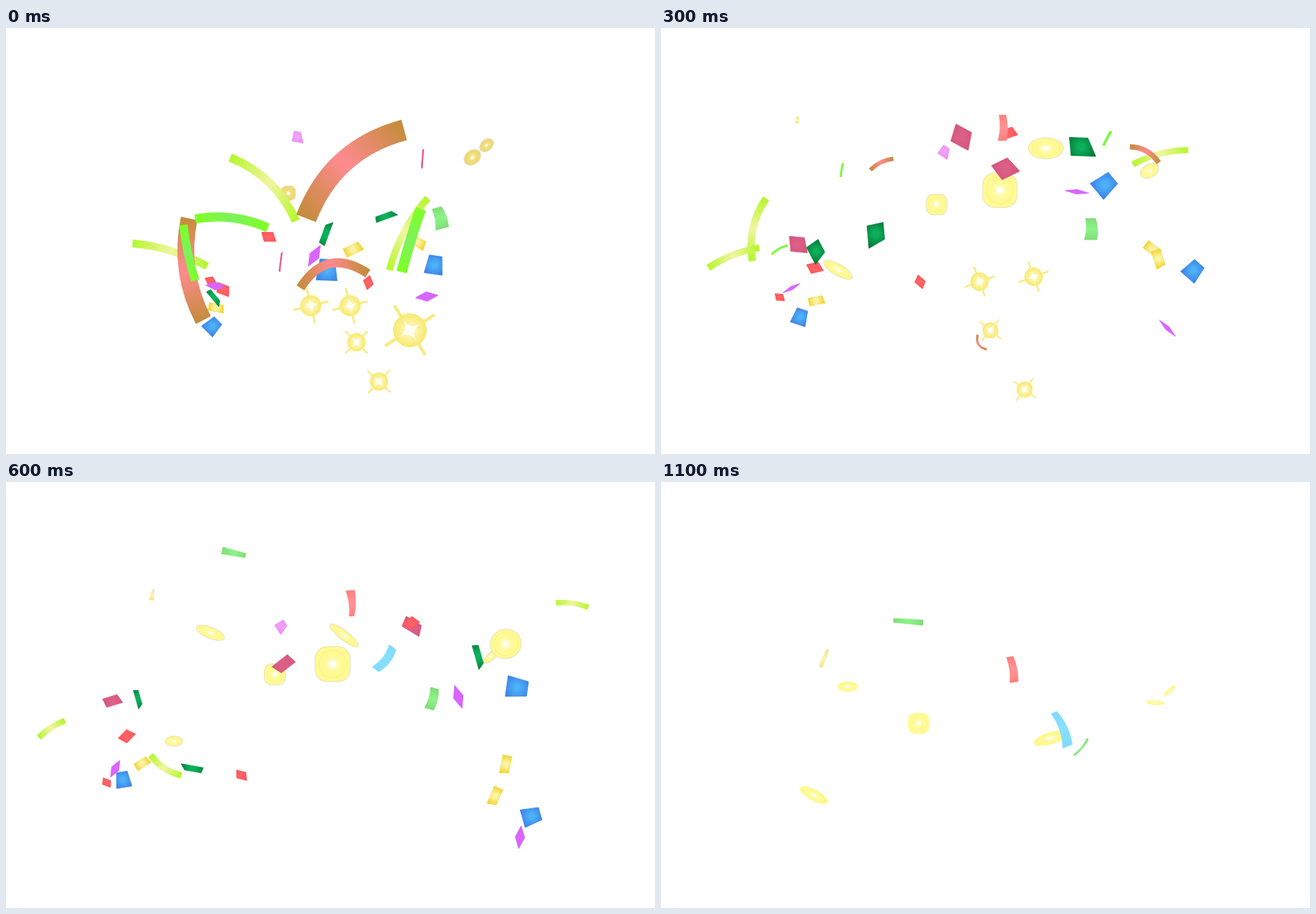
An HTML page with a canvas that plays this animation: 924 by 606 pixels, repeating every 1200 ms.

```html
<!DOCTYPE html>
<html lang="en">
<head>
<meta charset="utf-8">
<title>Confetti burst</title>
<style>
  html, body { margin: 0; width: 100%; height: 100%; overflow: hidden; background: #fff; }
  canvas { display: block; }
</style>
</head>
<body>
<canvas id="stage" width="924" height="606"></canvas>
<script>
const ctx = document.getElementById('stage').getContext('2d');
const STEP_MS = 100, STEPS = 12;
const { PI, sin, cos, abs, exp, min, max } = Math;

// All motion below is a function of t, counted in steps since the burst
const items = [];
const show = (from, to, draw) => items.push({ from, to, draw });

function place(x, y, degrees, draw) {
  ctx.save();
  ctx.translate(x, y);
  ctx.rotate(degrees * PI / 180);
  draw();
  ctx.restore();
}

function glow(radius, [edge, middle], core = 0.2) {
  const shade = ctx.createRadialGradient(0, 0, 0, 0, 0, radius);
  shade.addColorStop(core, middle);
  shade.addColorStop(1, edge);
  return shade;
}

function along(length, [edge, middle]) {
  const shade = ctx.createLinearGradient(-length / 2, 0, length / 2, 0);
  shade.addColorStop(0, edge);
  shade.addColorStop(0.5, middle);
  shade.addColorStop(1, edge);
  return shade;
}

function polygon(points, fill) {
  ctx.beginPath();
  for (const [x, y] of points) ctx.lineTo(x, y);
  ctx.closePath();
  ctx.fillStyle = ctx.strokeStyle = fill;
  ctx.lineWidth = 0.8;
  ctx.fill();
  ctx.stroke();
}

const mix = (a, b, k) => [a[0] + (b[0] - a[0]) * k, a[1] + (b[1] - a[1]) * k];

// Launch, kick and burst points, then a slowing drift to the last point
function flight(points) {
  const [launch, kick, burst, rest] = points.split(' ').map(p => p.split(',').map(Number));
  return t => {
    if (t <= 1) return mix(launch, kick, t);
    if (t <= 3) return mix(kick, burst, (t - 1) / 2);
    const u = (t - 3) / 4;
    return mix(burst, rest, u * (1.4 - 0.4 * u));
  };
}

// Light parts all sink on one curve, scaled by their weight
const sink = t => 5 * t + 0.04 * t ** 3;
const sinking = (born, x, y, drift, weight, bend = 0) => t => {
  const age = t - born;
  return [x + drift * age + bend * age * age, y + weight * (sink(t) - sink(born))];
};

// ---- Rings ----
function ring(x, y, w, h, degrees, squarish, t) {
  const early = t < 2, tone = early ? '#efdc78' : '#fffa94';
  place(x, y, degrees, () => {
    ctx.scale(w / 2, h / 2);
    const shade = ctx.createRadialGradient(0, 0, 0, 0, 0, 1);
    shade.addColorStop(0.14, '#fff');
    shade.addColorStop(0.24, early ? '#f6e9a0' : '#fffbb8');
    shade.addColorStop(0.5, tone);
    shade.addColorStop(0.72, tone);
    shade.addColorStop(0.77, early ? '#ecd66c' : '#fbf386');
    shade.addColorStop(0.84, tone);
    ctx.beginPath();
    if (squarish) ctx.roundRect(-1, -1, 2, 2, 0.7);
    else ctx.ellipse(0, 0, 1, 1, 0, 0, 2 * PI);
    ctx.fillStyle = shade;
    ctx.fill();
  });
  if (t > 8) return;
  ctx.lineWidth = 1.5;
  ctx.strokeStyle = 'rgba(225,210,185,.5)';
  ctx.stroke();
}

function flatRing(from, to, size, move) {
  show(from, to, t => {
    const d = size * min(1, 0.68 + 0.1 * t);
    ring(...move(t), d, d, 0, true, t);
  });
}

// Width swings while the disc tilts
function tiltRing(born, swing, move) {
  show(born, 11, t => {
    const c = cos(2 * PI * (t - swing) / 8.5);
    ring(...move(t), 33 + 13 * c, 15 + c, 30 * max(0, c), false, t);
  });
}

flatRing(1, 10, 50, sinking(1, 494, 217, -5.8, 1.25));
flatRing(0, 11, 30, sinking(0, 402, 235, -3.2, 1));
tiltRing(3, 3, sinking(3, 252, 344, -4.3, 1.1));
tiltRing(5, 5, sinking(5, 296, 205, -5, 1.1));

const hoop = sinking(3, 548, 171, -36, 2.1, 4.6);
show(3, 11, t => ring(...hoop(t), 50, 50 * max(0.1, abs(cos(0.55 + 0.125 * t))), 39 * sin(PI * (t - 3) / 7), false, t));

// A big lobe with a small one swinging around it
const lobe = sinking(0, 664, 184, 13, 1.2, -0.85);
show(0, 11, t => {
  const [x, y] = lobe(t), swing = cos(2 * PI * (t - 0.5) / 11), open = exp(-(((t - 5.7) / 1.7) ** 2));
  ring(x + 21 * swing, y - 18 * swing, 22 + 4 * open, 16 - 0.9 * t, -42, false, t);
  ring(x, y, 26 + 19 * open, 20 - 1.2 * t + 30 * open, -40 + 4 * t, false, t);
});

// ---- Stars ----
function star(to, x, y, vx, vy, size, turn, shrink = 0.13) {
  show(0, to, t => place(x + vx * t, y + vy * t, turn + 28 * t, () => {
    const r = size * (1 - shrink * min(t, 1)), spike = r * 1.65;
    ctx.beginPath();
    ctx.moveTo(-spike, 0);
    ctx.lineTo(spike, 0);
    ctx.moveTo(0, -spike);
    ctx.lineTo(0, spike);
    ctx.lineWidth = r * 0.2;
    ctx.lineCap = 'round';
    ctx.strokeStyle = '#f8ec84';
    ctx.stroke();
    ctx.beginPath();
    ctx.arc(0, 0, r, 0, 2 * PI);
    ctx.fillStyle = glow(r, ['#f8e96c', '#fdf7bc'], 0.25);
    ctx.fill();
    const tip = r * 0.8;
    ctx.beginPath();
    ctx.moveTo(0, -tip);
    for (const [dx, dy] of [[1, 0], [0, 1], [-1, 0], [0, -1]]) ctx.quadraticCurveTo(0, 0, dx * tip, dy * tip);
    ctx.fillStyle = 'rgba(255,255,255,.8)';
    ctx.fill();
  }));
}

star(3, 434, 395, 6.5, -11.4, 15, -14);
star(3, 490, 395, 13.5, -13.7, 15, -14);
star(3, 499, 447, -10, -5.7, 13, 45);
star(1, 575, 430, 28, 1, 24, -32, 0.5);
star(3, 531, 503, -4.4, 3.8, 13, 43);

// ---- Paper chips: each kind has one shape and one way of flipping ----
const blue = { w: 13, h: 13, taper: 0.7, skew: 0, color: ['#3f84e8', '#4cb2f8'], flip: () => 1 };
const gold = { w: 13, h: 6.5, taper: 0.9, skew: 0.1, color: ['#f1cc14', '#fbf3a4'], flip: () => 1 };
const red = { w: 8.5, h: 6.5, taper: 0.95, skew: 0.3, color: ['#ff555a', '#ff6468'], flip: () => 1 };
const crimson = { w: 14, h: 13, taper: 0.9, skew: 0.25, color: ['#d4567c', '#dd6088'], flip: t => max(0.06, abs(sin(PI * t / 5))) };
const forest = { w: 16, h: 13, taper: 0.75, skew: 0.3, color: ['#06783a', '#0cb05a'], flip: t => 0.3 + 0.6 * abs(sin(PI * t / 6)) };
const purple = { w: 17, h: 13, diamond: true, color: ['#d45cff', '#da66ff'], flip: t => 0.4 + 0.3 * cos(PI * (t - 1) / 3) };
const pink = { w: 8, h: 8, taper: 0.6, skew: 0.2, color: ['#ea90f6', '#f0a2f8'], flip: () => 0.9 };

function chip(kind, move, angle, spin, size = 1, from = 0, to = 8) {
  show(from, to, t => place(...move(t), angle + spin * t, () => {
    const w = kind.w * size, h = kind.h * size * kind.flip(t), lean = kind.skew * h, top = w * kind.taper;
    polygon(kind.diamond ? [[-w, 0], [0, -h], [w, 0], [0, h]]
      : [[-top - lean, -h], [top - lean, -h], [w + lean, h], [lean - w, h]], glow(max(w, h) * 1.2, kind.color));
  }));
}

// ---- Long streamers ----
const brown = ['#c58c3c', '#ff8a90'], green = ['#80ff24', '#7cf25c'], lime = ['#b4f72c', '#f1f5a0'];

const slowShrink = t => 1 - 0.1 * t;
const fastShrink = t => 1 - 0.375 * max(0, t - 1);

function streamer(color, points, length, width, bow, angle) {
  const fast = color !== lime, move = flight(points);
  show(0, fast ? 3 : 7, t => {
    const scale = fast ? fastShrink(t) : slowShrink(t), half = length * scale / 2, dip = bow * scale;
    place(...move(t), angle(t), () => {
      ctx.beginPath();
      ctx.moveTo(-half, dip);
      ctx.quadraticCurveTo(0, -dip, half, dip);
      ctx.lineWidth = width * (fast ? scale : 1 - 0.04 * t);
      ctx.strokeStyle = along(half * 2, color);
      ctx.stroke();
    });
  });
}

const settle = (start, turn, rate) => t => start + turn * (1 - exp(-rate * t));

chip(blue, flight('457,344 514,278 632,223 748,307'), 2, 16, 1.15);
chip(blue, flight('610,337 685,277 758,345 746,503'), 8, 11);
chip(blue, flight('294,424 247,411 198,411 160,426'), 45, -9, 0.85);

chip(gold, flight('494,315 643,238 700,315 714,420'), -25, 21);
chip(gold, flight('585,304 585,267 708,328 694,472'), 30, 14);
chip(gold, flight('299,398 260,386 221,388 188,403'), 10, -7, 0.85);

streamer(lime, '375,220 258,166 131,285 245,433', 130, 12, 13, settle(44, -280, 0.19));
streamer(lime, '235,317 165,310 102,323 56,355', 111, 11, 6, settle(17, -55, 0.4));
streamer(lime, '567,290 629,219 710,179 827,171', 116, 10, 7, settle(-62, 90, 0.25));

chip(crimson, flight('593,186 558,14 428,155 389,281'), -86, 38);
chip(crimson, flight('391,333 412,266 490,200 597,206'), -83, 19);
chip(crimson, flight('242,322 242,322 195,308 142,312'), 28, -7.5, 0.85, 2);

chip(red, flight('374,297 388,204 496,149 594,211'), 0, -6);
chip(red, flight('516,362 452,330 369,361 328,429'), 68, -9, 0.85);
chip(red, flight('309,372 267,347 219,341 162,366'), 20, -11, 1.05);
chip(red, flight('291,359 226,349 169,383 138,437'), -10, 5, 0.7);

chip(purple, flight('439,324 489,263 592,233 655,321'), -60, 22);
chip(purple, flight('599,382 660,368 721,427 734,522'), -6, 17, 0.95);
chip(purple, flight('298,367 240,348 186,370 149,416'), 5, -11, 0.8);
chip(pink, sinking(0, 415, 155, -3.8, 1.3), 10, 8, 1, 0, 9);

chip(forest, flight('455,293 500,207 598,169 688,264'), -70, 24, 1.1);
chip(forest, flight('540,268 434,179 306,293 257,432'), -20, 35);
chip(forest, flight('296,383 259,348 221,317 181,306'), 50, 4, 0.85);

// ---- Short strips: the two end widths take turns as the strip twists ----
const mint = ['#82dc78', '#8cf488'], salmon = ['#ff7f7a', '#ff9498'], sky = ['#80daff', '#8adfff'], cream = ['#f6e49c', '#fdf3a8'];

function strip(color, born, move, length, angle, ends, node, { rate = PI / 8, lag = PI / 2, twist = 0.9, bow = 2 } = {}) {
  show(born, 11, t => {
    const [a, b] = ends.map((w, i) => w / 2 * (1 - twist + twist * abs(sin(rate * (t - node) + i * lag))));
    const half = length(t) / 2;
    place(...move(t), angle(t), () => {
      ctx.beginPath();
      ctx.moveTo(-half, bow - a);
      ctx.quadraticCurveTo(0, -bow - (a + b) / 2, half, bow - b);
      ctx.lineTo(half, bow + b);
      ctx.quadraticCurveTo(0, -bow + (a + b) / 2, -half, bow + a);
      ctx.fillStyle = along(half * 2, color);
      ctx.fill();
    });
  });
}

strip(mint, 0, sinking(0, 619, 270, -1.8, 1), () => 31, t => 75 + 5 * t, [15, 20], 12, { rate: PI / 20, lag: 0.2 });
strip(mint, 5, sinking(5, 319, 89, 5.5, 1.4), t => 25 + 1.6 * t, t => 22 - 1.6 * t, [14, 9], 4, { bow: 0 });
strip(salmon, 3, sinking(3, 488, 142, 1.7, 1.35), () => 37, t => 94 - 1.2 * t, [14, 17], 9);
strip(sky, 5, sinking(5, 535, 241, 6.3, 1.4), t => 26 + 2.4 * t, t => 200 - 12 * t, [13, 15], 3, { twist: 0.3, bow: 4 });
strip(cream, 3, sinking(3, 194, 131, 4.8, 1.3), t => 3 + 2.2 * t, t => 90 + 2 * t, [6, 8], 5, { bow: 0 });

streamer(brown, '481,190 588,147 691,175', 188, 30, 24, t => -42 + 29 * t - 1.8 * t * t);
streamer(brown, '258,345 267,258 313,191', 146, 24, -13, t => 82 + 24 * t);
streamer(brown, '462,335 418,385 452,450', 98, 13, 25, settle(-12, -113, 1.2));
streamer(green, '576,302 601,230 635,157', 94, 15, 1, t => -73 + 3.5 * t);
streamer(green, '322,270 230,283 168,314', 104, 13, 8, settle(7, -38, 1));
streamer(green, '259,320 253,250 257,202', 81, 12, -2, settle(78, 22, 0.9));

function render() {
  const t = Math.floor(performance.now() / STEP_MS) % STEPS;
  ctx.clearRect(0, 0, 924, 606);
  ctx.lineCap = 'butt';
  for (const { from, to, draw } of items) if (t >= from && t <= to) draw(t);
  requestAnimationFrame(render);
}
render();
</script>
</body>
</html>
```
